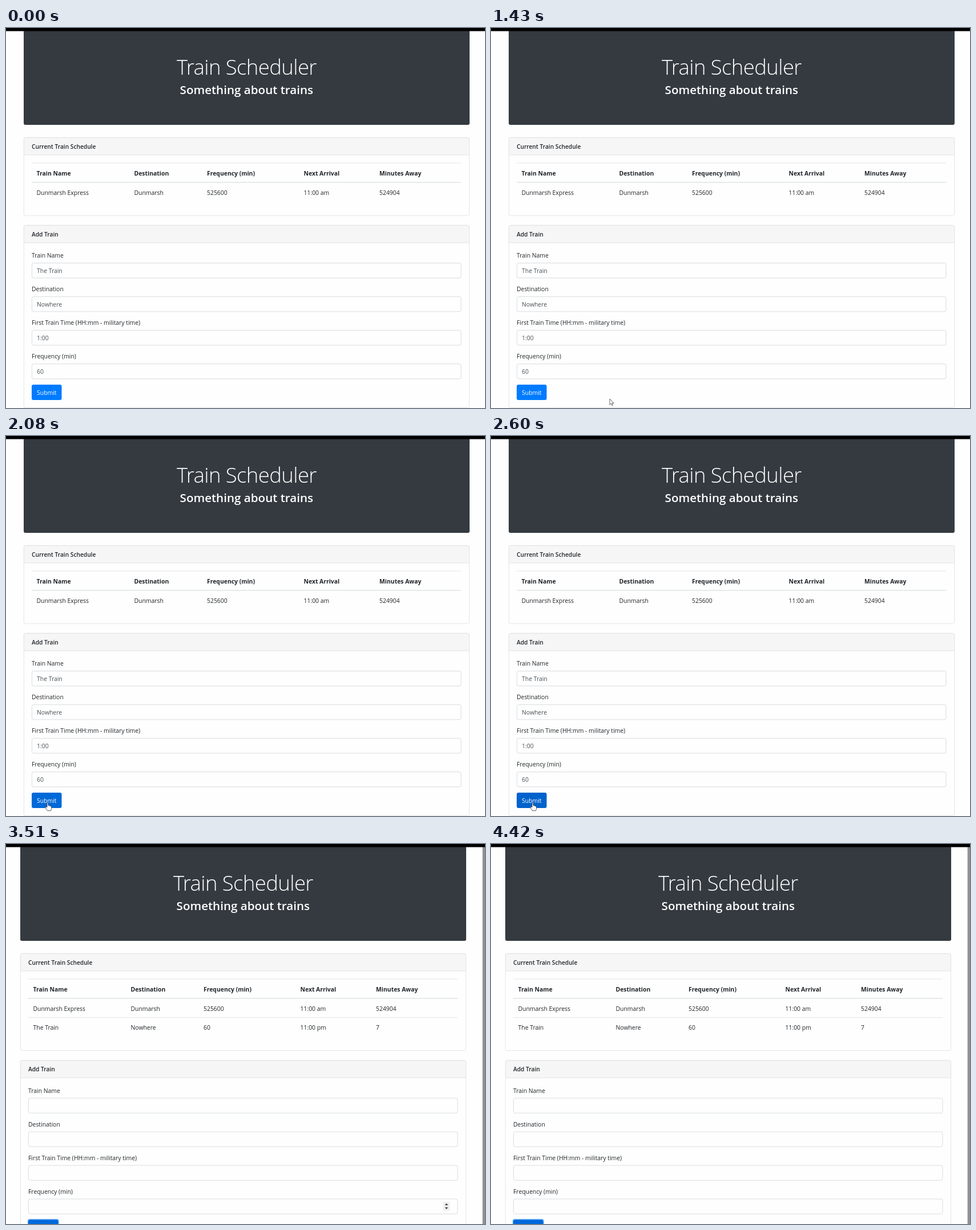
Animation of 839 by 667 pixels, one loop 5070 ms. Source, as an HTML page:

```html
<!DOCTYPE html>
<html lang="en">
<head>
<meta charset="utf-8">
<title>Train Scheduler</title>
<style>
  html, body { margin: 0; width: 100%; height: 100%; overflow: hidden; background: #fefefe; }
  svg { display: block; width: 839px; height: 667px; }
  text { font: 400 10.4px "Open Sans", "Noto Sans", sans-serif; fill: #212529; white-space: pre; }
  .title { font-size: 36.5px; font-weight: 300; letter-spacing: -.6px; fill: #fff; text-anchor: middle; }
  .sub { font-size: 20.6px; font-weight: 600; fill: #fff; text-anchor: middle; }
  .head { font-weight: 600; font-size: 10.2px; }
  .th { font-weight: 700; }
  .value { fill: #495057; }
  .btn { fill: #fff; text-anchor: middle; }
  .card { fill: #fefefe; stroke: #dfdfdf; stroke-width: .8; }
  .bar { fill: #f6f6f6; stroke: #dfdfdf; stroke-width: .8; }
  .rule { stroke: #dee2e6; stroke-width: .9; }
  .rule.thick { stroke-width: 1.4; }
  .input { fill: #fefefe; stroke: #ced4da; stroke-width: .8; }
</style>
</head>
<body>
<svg id="stage" viewBox="0 0 839 667"></svg>
<script>
const LOOP = 5070;
const COLS = [53.5, 224.5, 352, 521.5, 654];
const HEADERS = ["Train Name", "Destination", "Frequency (min)", "Next Arrival", "Minutes Away"];
const ROWS = [
  ["Dunmarsh Express", "Dunmarsh", "525600", "11:00 am", "524904"],
  ["The Train", "Nowhere", "60", "11:00 pm", "7"]
];
const FIELDS = [
  ["Train Name", "The Train"],
  ["Destination", "Nowhere"],
  ["First Train Time (HH:mm - military time)", "1:00"],
  ["Frequency (min)", "60"]
];
// start time, pointer kind, tip x, tip y
const POINTER = [
  [0, "", 0, 0],
  [910, "arrow", 245.5, 647.5],
  [1430, "arrow", 208, 651],
  [1560, "arrow", 150, 655],
  [1690, "arrow", 104, 657.5],
  [1820, "arrow", 81.5, 657],
  [1950, "hand", 76, 647],
  [2080, "hand", 73, 643.5],
  [3510, "", 0, 0]
];
const BUTTON = [[0, "#007bff"], [1950, "#0069d9"], [2470, "#0062cc"], [2730, "#0069d9"]];
const ADDED = 2730, SPINNER_END = 4290;

const text = (x, y, s, cls = "") => `<text x="${x}" y="${y}" class="${cls}">${s}</text>`;
const box = (x, y, w, h, attrs) => `<rect x="${x}" y="${y}" width="${w}" height="${h}" ${attrs}/>`;
const rule = (y, cls = "") => `<path class="rule ${cls}" d="M45 ${y}H797"/>`;
const cells = (row, y, cls) => row.map((s, i) => text(COLS[i], y, s, cls)).join("");

function card(y, h, title) {
  return box(31.4, y, 780.2, h, 'rx="3" class="card"') +
    `<path class="bar" d="M31.4 ${y + 30.5}v-27.5q0-3 3-3h774.2q3 0 3 3v27.5z"/>` +
    text(45, y + 19.5, title, "head");
}

function field([label, value], i) {
  const y = 403 + i * 59;
  return text(45, y, label) +
    box(45.4, y + 9.6, 751.6, 26.2, 'rx="3" class="input"') +
    `<g class="before">${text(54, y + 27.3, value, "value")}</g>`;
}

const banner = '<path fill="#343a40" d="M31 5H812V167q0 3-3 3H34q-3 0-3-3z"/>' +
  text(421.5, 82, "Train Scheduler", "title") +
  text(421.3, 116, "Something about trains", "sub");

const table = `<g class="before">${card(192.4, 136.8, "Current Train Schedule")}</g>` +
  `<g class="after">${card(192.4, 170.2, "Current Train Schedule")}${rule(304.5)}${cells(ROWS[1], 326)}</g>` +
  rule(237) + rule(271, "thick") + cells(HEADERS, 258.5, "th") + cells(ROWS[0], 292.5);

const spinner = '<g id="spinner">' + box(771.5, 594.5, 12, 16, 'fill="#f0f0f0"') +
  '<path fill="#404040" d="M774.5 600.5l3-3.3 3 3.3zM774.5 604.3l3 3.3 3-3.3z"/></g>';

const form = card(346.4, 320, "Add Train") + FIELDS.map(field).join("") + spinner +
  `<g class="after">${box(43.6, 624.6, 55.2, 29.8, 'rx="4" fill="#80bdff"')}</g>` +
  box(45, 626, 52.5, 27, 'rx="3" id="button"') + text(71.3, 643.6, "Submit", "btn");

const arrow = '<path id="arrow" fill="#fff" stroke="#555" stroke-width=".9" stroke-linejoin="round" ' +
  'd="M0 0V10.3L2.4 8.1 4 11.7 5.6 11 4 7.5H7.2Z"/>';

const hand = '<path id="hand" fill="#fff" stroke="#333" stroke-width=".8" stroke-linejoin="round" ' +
  'd="M-1 8V1.2Q-1 0 0 0T1 1.2V5Q3 4.4 3.1 5.7 4.8 5.2 5 6.4 6.6 6.2 6.6 7.6V10.2Q6.6 12 5.4 14.2H-.4Q-2.4 11.5-3.9 9-4.2 7.4-2.7 7.5Z"/>';

const stage = document.getElementById("stage");
stage.innerHTML = `<g id="page">${banner}${table}<g id="form">${form}</g></g>` +
  `<g class="after">${box(833, 5, 6, 662, 'fill="#f1f1f1"')}${box(834.8, 5, 4.2, 662, 'fill="#919191"')}</g>` +
  box(0, 0, 839, 5.5, 'fill="#000"') + arrow + hand;

const get = id => document.getElementById(id);
const show = (el, on) => el.style.display = on ? "" : "none";
const move = (el, x, y) => el.setAttribute("transform", `translate(${x} ${y})`);
const at = (steps, t) => steps.findLast(s => s[0] <= t);

function draw(t) {
  const added = t >= ADDED;
  document.querySelectorAll(".before").forEach(el => show(el, !added));
  document.querySelectorAll(".after").forEach(el => show(el, added));
  move(get("page"), added ? -6 : 0, 0);
  move(get("form"), 0, added ? 33.5 : 0);
  show(get("spinner"), added && t < SPINNER_END);
  get("button").setAttribute("fill", at(BUTTON, t)[1]);
  const [, kind, x, y] = at(POINTER, t);
  for (const id of ["arrow", "hand"]) {
    show(get(id), id === kind);
    move(get(id), x, y);
  }
}

const start = performance.now();
function tick() {
  draw((performance.now() - start) % LOOP);
  requestAnimationFrame(tick);
}
tick();
</script>
</body>
</html>
```
